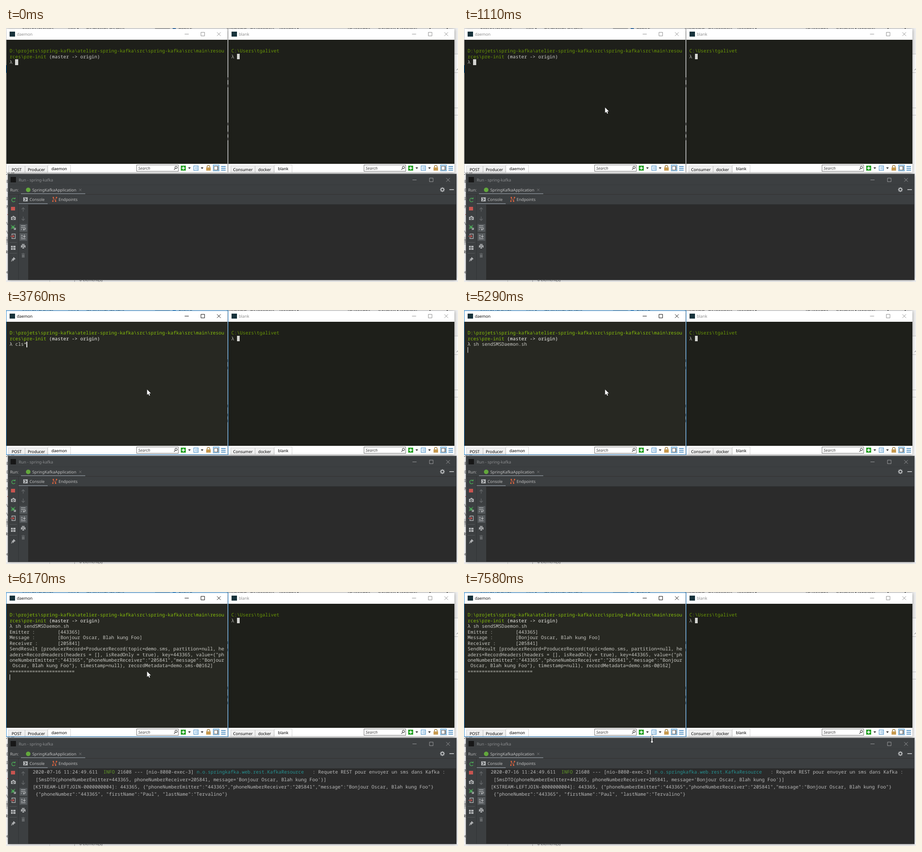
Recreate the animation shown at these times as an HTML page with a canvas. Size 998 by 561 pixels, loop 8 s.

```html
<!DOCTYPE html>
<html lang="fr">
<head>
<meta charset="utf-8">
<style>
html, body { margin: 0; width: 100%; height: 100%; overflow: hidden; background: #ececec; }
canvas { display: block; }
</style>
</head>
<body>
<canvas id="stage" width="998" height="561"></canvas>
<script>
const ctx = document.getElementById('stage').getContext('2d');
ctx.textRendering = 'geometricPrecision';
const MONO = '10.4px "Noto Sans Mono", "DejaVu Sans Mono", monospace';
const UI = '8.9px "Noto Sans", "Open Sans", sans-serif';
const CHAR = 6.24, ROW = 12.45;

function box(x, y, w, h, color) {
  ctx.fillStyle = color;
  ctx.fillRect(x, y, w, h);
}
function frame(x, y, w, h, color, width = 1) {
  ctx.strokeStyle = color;
  ctx.lineWidth = width;
  ctx.strokeRect(x + .5, y + .5, w - 1, h - 1);
}
// A window body with a soft drop shadow.
function raised(x, y, w, h, color) {
  ctx.save();
  ctx.shadowColor = 'rgba(0, 0, 0, .4)';
  ctx.shadowBlur = 8;
  box(x, y, w, h, color);
  ctx.restore();
}
function text(s, x, y, color, font = UI, align = 'left') {
  ctx.font = font;
  ctx.textAlign = align;
  ctx.fillStyle = color;
  ctx.fillText(s, x, y);
}
// Draws an SVG path at x, y: stroked when a width is given, else filled.
function path(d, x, y, color, width) {
  ctx.save();
  ctx.translate(x, y);
  const p = new Path2D(d);
  if (width) {
    ctx.strokeStyle = color;
    ctx.lineWidth = width;
    ctx.stroke(p);
  } else {
    ctx.fillStyle = color;
    ctx.fill(p);
  }
  ctx.restore();
}

function desktop() {
  box(0, 0, 998, 561, '#f0f0f0');
  [['Sources récentes', 34], ['tout ▾', 137], ['les Modifier les liens', 177], ['Avancé', 381],
   ['Instantané : les doublons', 487], ['données ▾', 604], ['de données', 755],
   ['scénarios ▾ prévision', 821], ['▾', 934], ['▾', 972]]
    .forEach(([s, x]) => text(s, x, 3, '#444'));
  box(329, 0, 33, 3, '#b5b5b5');
  box(368, 0, 7, 3, '#3b78b5');

  box(990, 58, 8, 503, '#fcfcfc');
  [57, 98, 176, 192].forEach(y => box(990, y, 8, 1, '#c8c8c8'));
  path('M0 3 L4 -1', 995, 90, '#666', 1);
  box(994, 530, 4, 14, '#b9dcf3');

  box(0, 82, 1, 17, '#0078d7');
  box(0, 319, 998, 238, '#fcfcfc');
  box(0, 461, 5, 18, '#d9d9d9');
  [['E', 342], ['D', 361], ['I', 380], ['N', 398], ['V', 435], ['V', 454], ['S', 473], ['Re', 498], ['e', 542]]
    .forEach(([s, y]) => text(s, s === 'Re' ? -1 : 1, y, '#333'));
  box(3, 411, 2, 2, '#d04a3a');
  text('Ce PC', -2, 324, '#333');

  [112, 128, 212, 232, 245].forEach(y => box(489, y - 3, 2, 6, '#777'));

  box(0, 557, 998, 4, '#f0f0f0');
  box(151, 557, 1, 4, '#aaa');
  box(96, 557, 1, 4, '#ccc');
  text('6 élément(s)', 162, 559, '#444');
}

function controls(x, y, gap, color) {
  path('M-4.5 .5 H4.5', x, y, color, 1);
  path('M-4 -4 H4 V4 H-4 Z', x + gap + .5, y + .5, color, 1);
  path('M-4 -4 L4 4 M4 -4 L-4 4', x + 2 * gap + 1, y + .5, color, 1);
}

function terminal(x, w, title, tabs, active, barX) {
  raised(x, 2, w, 317, '#fff');
  box(x + 7, 8, 12, 11, '#17323b');
  text(title, x + 23, 17, active ? '#111' : '#8d8d8d');
  controls(barX + 111, 13, 35, active ? '#111' : '#909090');
  box(x, 26, w, 274, active ? '#272822' : '#1e1f1a');

  tabs.forEach(([name, left, width], i) => {
    const top = i === 2 ? 302 : 304;
    box(left, top, width, 319 - top, i === 2 ? '#fff' : '#f1f1f1');
    frame(left, top, width, 18, '#d6d6d6');
    if (i === 2) box(left + 1, 317, width - 2, 2, '#fff');
    text(name, left + width / 2, i === 2 ? 314 : 315.5, '#000', UI, 'center');
  });

  ctx.save();
  ctx.translate(barX, 0);
  frame(0, 302, 93, 15, '#777');
  text('Search', 4, 312.5, '#444', 'italic ' + UI);
  path('M3 -1 A2.5 2.5 0 1 1 3 -1.1 M-1 1 L-4 4', 87, 309, '#444', 1.2);
  box(98, 304, 11, 11, '#22a022');
  path('M-3.5 0 H3.5 M0 -3.5 V3.5', 103.5, 309.5, '#fff', 1.8);
  for (const tx of [117, 145]) path('M-3 -1.5 H3 L0 1.5 Z', tx, 309.5, '#111');
  box(126, 304, 11, 11, '#e4f1fb');
  frame(126, 304, 11, 11, '#4c92c8');
  path('M-1 -2 V3 M2 -3 V4', 132, 309, '#7aa9d0', 1);
  path('M-3 0 V-2 A3 3 0 0 1 3 -2 V0', 159, 308.5, '#9b7a3c', 1.4);
  box(154, 308, 10, 7, '#c89b50');
  box(169, 302, 14, 14, '#cbe4f7');
  frame(169, 302, 14, 14, '#4c9ad0');
  box(171, 305, 10, 9, '#fff');
  frame(171, 305, 10, 9, '#666');
  box(178, 306, 2, 7, '#999');
  for (const y of [305, 309, 313]) box(187, y, 10, 1.5, '#2474b4');
  ctx.restore();
}

// Writes runs of [string, colour] one after another on a terminal row.
function rowText(x, row, ...runs) {
  let col = 0;
  for (const [s, color] of runs) {
    text(s, x + col * CHAR, 54.4 + row * ROW, color, MONO);
    col += s.length;
  }
}

const OUTPUT = [
  'Emitter :        [443365]',
  'Message :        [Bonjour Oscar, Blah kung Foo]',
  'Receiver :       [205841]',
  'SendResult [producerRecord=ProducerRecord(topic=demo.sms, partition=null, he',
  'aders=RecordHeaders(headers = [], isReadOnly = true), key=443365, value={"ph',
  'oneNumberEmitter":"443365","phoneNumberReceiver":"205841","message":"Bonjour',
  ' Oscar, Blah kung Foo"}, timestamp=null), recordMetadata=demo.sms-0@162]',
  '======================='
];

const ACTIVATED = 1140;
// Start time, visible, column, row of the bar caret
const CARET = [
  [1140, 1, 2, 2], [1660, 0], [2170, 1, 2, 2], [2690, 0], [2840, 1, 5, 2], [3420, 0],
  [3760, 1, 6, 2], [4270, 1, 21, 2], [4830, 0], [5290, 1, 0, 3], [5800, 0],
  [5990, 1, 0, 11], [6500, 0], [7050, 1, 0, 11], [7580, 0]
];
const TYPED = [[0, ''], [2840, 'cls'], [3760, 'cls*'], [4270, 'sh sendSMSDaemon.sh']];
const latest = (list, t) => list.filter(e => e[0] <= t).pop();

function session(t) {
  const active = t >= ACTIVATED;
  const green = active ? '#86c009' : '#6a9806', white = active ? '#f3f3ee' : '#cfcfca';
  rowText(8, 0, ['D:\\projets\\spring-kafka\\atelier-spring-kafka\\src\\spring-kafka\\src\\main\\resou', green]);
  rowText(8, 1, ['rces\\pre-init', green], [' (master -> origin)', white]);
  rowText(8, 2, ['λ ', active ? '#d6d6d0' : '#bdbdb8'], [latest(TYPED, t)[1], '#cacac5']);
  const shown = t < 5890 ? 0 : t < 5990 ? 3 : OUTPUT.length;
  OUTPUT.slice(0, shown).forEach((s, i) => rowText(8, 3 + i, [s, '#cacac5']));
  if (!active) return box(20, 69, 7, 13, '#d3d3d0');
  const [, on, col, row] = latest(CARET, t);
  if (on) box(Math.round(8 + col * CHAR), Math.round(44.6 + row * ROW), col ? 2 : 1, 12.5, '#f0f0f0');
}

function ide(t) {
  raised(5, 323, 989, 233, '#3c3f41');
  frame(4, 322, 991, 235, '#5b5e60');
  box(10, 329, 12, 12, '#171717');
  text('Run - spring-kafka', 28, 339, '#8b8d8f');
  controls(902, 335, 36.5, '#9a9c9e');
  box(5, 346, 989, 1, '#36393b');
  text('Run:', 9, 360.5, '#bbb');
  ctx.beginPath();
  ctx.arc(49, 357.5, 5, 0, 7);
  ctx.fillStyle = '#63a83c';
  ctx.fill();
  text('SpringKafkaApplication', 58, 360.5, '#c0c0c0');
  path('M-2.5 -2.5 L2.5 2.5 M2.5 -2.5 L-2.5 2.5', 164, 357.5, '#777', 1);
  box(33, 365, 142, 2, '#747a80');
  box(5, 367, 989, 1, '#323232');
  path('M3.2 0 A3.2 3.2 0 1 1 3.2 -.1', 963.5, 357, '#b0b2b4', 2.4);
  for (let i = 0; i < 8; i++) {
    const a = i * Math.PI / 4;
    box(962.7 + 4.5 * Math.cos(a), 356.2 + 4.5 * Math.sin(a), 1.6, 1.6, '#b0b2b4');
  }
  box(979, 356, 10, 2, '#b0b2b4');

  box(38, 374, 10, 9, '#b0b3b5');
  path('M-2 -3 L1.5 0 L-2 3', 43, 378.5, '#3c3f41', 1.5);
  text('Console', 52, 382, '#c0c0c0');
  box(28, 387, 64, 2, '#747a80');
  path('M-3.5 3.5 L-2 -3 L2 3 L4 -3.5', 107, 378.5, '#b4573c', 1.2);
  for (const [x, y] of [[102, 381], [103, 373], [108, 381], [110, 373]]) box(x, y, 3, 3, '#c9603f');
  text('Endpoints', 116, 382, '#c0c0c0');

  box(27, 368, 1, 188, '#323537');
  box(49, 389, 945, 167, '#2b2b2b');
  box(28, 389, 966, 1, '#323537');
  tools();
  if (t >= 6170) log();
}

function tools() {
  const grey = '#afb1b3', green = '#499c54', dim = '#65686a';
  path('M3.5 -3 A4 4 0 1 0 4 2', 16, 380, green, 1.6);
  path('M1 -2 H6 V-6 Z', 15, 380, green);
  box(11, 395, 9, 8, '#c75450');
  path('M-5 -3 H-2 L-1 -5 H2 L3 -3 H5.5 V4 H-5 Z', 16, 420, grey);
  path('M2 .5 A2 2 0 1 1 2 .4', 16, 420, '#3c3f41', 1.3);
  path('M-3 -3 H2 V3 H-3 Z', 16, 440, green);
  path('M-5 -5 L4 4 M4 -5 L-5 4 M-5 0 H4', 16, 440, green, 1.2);
  path('M1 5 H5 V1 M5 5 L1 1', 16, 440, grey, 1.4);
  path('M-3 -2 V-5 H4.5 V5 H-3 V2', 16, 460, grey, 1.4);
  path('M-6 0 H1 M-1 -2.5 L1.5 0 L-1 2.5', 16, 460, '#c75450', 1.4);
  box(8, 473, 16, 1, '#55585a');
  for (const [x, y, w] of [[11, 481, 4], [16, 481, 5], [11, 486, 4], [16, 486, 5]]) box(x, y, w, 4, grey);
  box(8, 497, 16, 1, '#55585a');
  path('M1 -5 L5 -1 L4 0 L3 0 L1 2 V4 L-4 -1 H-2 L0 -3 V-4 Z M-3 1 L-1 3 L-5 5 Z', 16, 511, grey);

  path('M0 4.5 V-4 M-3.5 -.5 L0 -4 L3.5 -.5', 38, 401, dim, 1.3);
  path('M0 -4.5 V4 M-3.5 .5 L0 4 L3.5 .5', 38, 421, dim, 1.3);
  box(30, 433, 17, 17, '#55595c');
  box(30, 453, 17, 17, '#55595c');
  path('M-5 -4 H5 M-5 0 H3 A2 2 0 0 1 3 4 H0 M2 2 L0 4 L2 6 M-5 4 H-3', 38, 441, grey, 1.3);
  path('M-5 4.5 H5 M-5 1 H-1 M-5 -3 H-1 M2.5 -5 V1 M0 -1.5 L2.5 1.5 L5 -1.5', 38, 461, grey, 1.3);
  path('M-3 -5 H3 V-3 H-3 Z M-5 -2 H5 V3 H3 V1 H-3 V3 H-5 Z M-2 2 H2 V5 H-2 Z', 38, 482, grey);
  path('M-4 -4 H-1 V-5 H1 V-4 H4 V-3 H-4 Z M-3 -2 H3 V5 H-3 Z', 38, 502, dim);
}

function log() {
  const grey = '#bbb';
  const line = (s, i, col = 0, color = grey) => text(s, 59 + col * CHAR, 401.2 + i * 16.3, color, MONO);
  line('2020-07-16 11:24:49.611', 0);
  line('INFO', 0, 25, '#639c28');
  line('21608 --- [nio-8080-exec-3]', 0, 30);
  line('n.o.springkafka.web.rest.KafkaResource', 0, 58, '#259393');
  line(': Requete REST pour envoyer un sms dans Kafka :', 0, 99);
  line("[SmsDTO{phoneNumberEmitter=443365, phoneNumberReceiver=205841, message='Bonjour Oscar, Blah kung Foo'}]", 1, 1);
  line('[KSTREAM-LEFTJOIN-0000000004]: 443365, {"phoneNumberEmitter":"443365","phoneNumberReceiver":"205841","message":"Bonjour Oscar, Blah kung Foo"}', 2);
  line('{"phoneNumber":"443365", "firstName":"Paul", "lastName":"Tervalino"}', 3, 1);
}

// Time, x, y of the pointer tip
const MOVES = [
  [410, 847, 533], [600, 540, 350], [820, 332, 212], [1090, 311, 175], [6170, 311, 175],
  [6550, 351, 274], [6640, 355, 284], [6790, 355, 284], [6960, 402, 396], [7060, 410, 360],
  [7150, 415, 325], [7300, 415, 324], [8000, 415, 324]
];
const ARROW = 'M.5 .5 V12.5 L3.2 10 L5.2 14.2 L7 13.4 L5.2 9.2 H9 Z';
const RESIZE = 'M0 -8.5 L3 -5 H1 V6 H3 L0 9.5 L-3 6 H-1 V-5 H-3 Z';

function pointer(t) {
  if (t < 410) return;
  const i = MOVES.findIndex(m => m[0] > t);
  const [t0, x0, y0] = MOVES[i - 1], [t1, x1, y1] = MOVES[i];
  const resizing = t >= 7150;
  const k = resizing ? 0 : (t - t0) / (t1 - t0);
  const x = Math.round(x0 + (x1 - x0) * k), y = Math.round(y0 + (y1 - y0) * k);
  const shape = resizing ? RESIZE : ARROW;
  path(shape, x, y, '#111', 1);
  path(shape, x, y, '#fff');
}

function draw() {
  const t = performance.now() % 8000, active = t >= ACTIVATED;
  desktop();
  terminal(491, 499, 'blank', [['Consumer', 496, 54], ['docker', 550, 42], ['blank', 592, 40]], false, 790);
  rowText(497.5, 0, ['C:\\Users\\tgalivet', '#6a9806']);
  rowText(497.5, 1, ['λ', '#bdbdb8']);
  box(510, 57, 6, 12, '#d3d3d0');
  terminal(1, 488, 'daemon', [['POST', 5, 37], ['Producer', 42, 50], ['daemon', 92, 51]], active, 288);
  // The left shadow must not darken its neighbour's edge.
  box(491, 2, 4, 24, '#fff');
  box(491, 26, 4, 274, '#1e1f1a');
  box(491, 300, 4, 19, '#fff');
  if (active) frame(0, 1, 491, 319, '#2b88d0');
  session(t);
  ide(t);
  pointer(t);
  requestAnimationFrame(draw);
}
draw();
</script>
</body>
</html>
```
